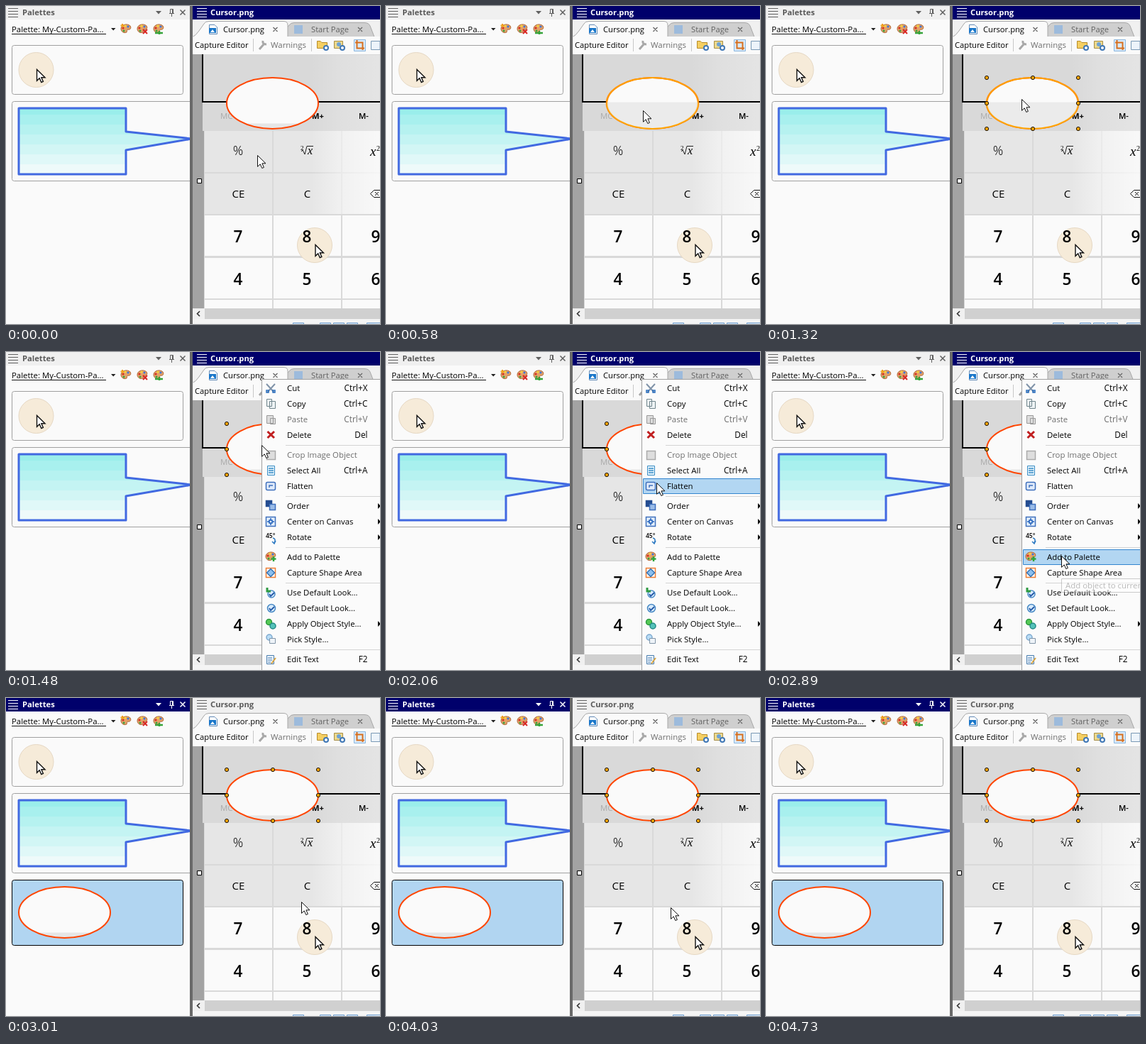
Animation of 527x448 px, one loop 5.24 s. Source, as an HTML page:

```html
<!DOCTYPE html>
<html lang="en">
<head>
<meta charset="utf-8">
<title>Add to Palette</title>
<style>
html, body { margin: 0; width: 100%; height: 100%; overflow: hidden; background: #fafafa; }
svg { display: block; }
text { font: 11.4px "Open Sans", "Noto Sans", sans-serif; fill: #000; }
.bold { font-size: 11.2px; font-weight: 700; }
.digit { font-size: 22.5px; font-weight: 600; text-anchor: middle; }
.key { font-size: 15px; text-anchor: middle; }
.math { font: italic 17px "Liberation Serif", serif; }
.muted { fill: #6d6d6d; }
.end { font-size: 11.8px; text-anchor: end; }

.hover, .handles, .menu, .late, .early, .row, .tip, .pointer { animation: 5240ms step-end infinite; }
.hover { animation-name: hover; }
.handles { animation-name: handles; }
.menu { animation-name: menu; }
.late { animation-name: late; }
.early { animation-name: early; }
.flatten { animation-name: flatten; }
.center { animation-name: center; }
.rotate { animation-name: rotate; }
.add { animation-name: add; }
.tip { animation-name: tip; }
.pointer { animation-name: pointer; }

@keyframes hover { 0%, 28.244% { opacity: 0 } 8.206% { opacity: 1 } }
@keyframes handles { 0% { opacity: 0 } 22.519%, 100% { opacity: 1 } }
@keyframes menu { 0%, 57.442% { opacity: 0 } 28.244% { opacity: 1 } }
@keyframes late { 0% { opacity: 0 } 57.442%, 100% { opacity: 1 } }
@keyframes early { 0% { opacity: 1 } 57.442%, 100% { opacity: 0 } }
@keyframes flatten { 0%, 41.603% { opacity: 0 } 39.312% { opacity: 1 } }
@keyframes center { 0%, 43.893% { opacity: 0 } 41.603% { opacity: 1 } }
@keyframes rotate { 0%, 46.183% { opacity: 0 } 43.893% { opacity: 1 } }
@keyframes add { 0% { opacity: 0 } 46.183%, 100% { opacity: 1 } }
@keyframes tip { 0% { opacity: 0 } 55.152%, 100% { opacity: .5 } }
@keyframes pointer {
  0% { transform: translate(354px, 210px) }
  5.343% { transform: translate(354px, 194px) }
  8.206% { transform: translate(363px, 165px) }
  11.068% { transform: translate(362px, 147px) }
  13.358% { transform: translate(361px, 133px) }
  16.412% { transform: translate(360px, 131px) }
  39.312% { transform: translate(381px, 184px) }
  41.603% { transform: translate(403px, 240px) }
  43.893% { transform: translate(413px, 267px) }
  46.183% { transform: translate(415px, 279px) }
  49.236% { transform: translate(416px, 287px) }
  62.595% { transform: translate(404px, 286px) }
  65.648% { transform: translate(387px, 283px) }
  76.908% { transform: translate(401px, 295px) }
  79.198% { transform: translate(420px, 310px) }
  82.251% { transform: translate(442px, 348px) }
  84.541% { transform: translate(472px, 416px) }
  87.404% { transform: translate(475px, 443px) }
  90.267%, 100% { transform: translate(540px, 460px) }
}
</style>
</head>
<body>
<svg width="527" height="448" viewBox="0 0 527 448">
  <defs>
    <linearGradient id="fade">
      <stop offset="0" stop-color="#fff" stop-opacity="0"/>
      <stop offset=".45" stop-color="#fff" stop-opacity=".45"/>
      <stop offset="1" stop-color="#fff" stop-opacity=".75"/>
    </linearGradient>
    <clipPath id="panel"><path d="M0 0H259V448H0z"/></clipPath>
    <clipPath id="balloon"><path d="M18 144H169V177L262 187L169 203V237H18z"/></clipPath>
    <clipPath id="oval"><ellipse rx="64.5" ry="36"/></clipPath>
    <path id="arrow" d="M.5 .5V16.3L4.2 12.8L6.8 18.5L9.4 17.4L6.9 11.8H12z" fill="#fff" stroke="#111"/>
    <g id="spot">
      <circle r="24.5" fill="#f6ebd9" stroke="#e6d8c4"/>
      <use href="#arrow" transform="translate(.5 -1)" stroke-width="1.4"/>
    </g>
    <g id="bars"><path d="M0 .5H14M0 4.5H14M0 8.5H14M0 12.5H14" fill="none" stroke="currentColor"/></g>
    <g id="shape">
      <g clip-path="url(#oval)">
        <path d="M-65-37H65V37H-65z" fill="#fafafa"/>
        <path d="M-65 28.5H65V37H-65z" fill="#e6e6e6"/>
      </g>
      <ellipse rx="64.5" ry="36" fill="none" stroke="#ff4500" stroke-width="2"/>
    </g>
    <g id="paints">
      <path d="M-7 0C-7-6 2-8 6-4C8-1 6 2 3 1C1 1 2 3 1 5C-3 7-7 4-7 0z" fill="#e3a268" stroke="#b0683a"/>
      <circle cx="-4" cy="-1" r="1.5" fill="#d52a20"/><circle cx="-1" cy="-4" r="1.5" fill="#f7d83c"/>
      <circle cx="3" cy="-3" r="1.5" fill="#3b73d8"/><circle cx="-3" cy="3" r="1.5" fill="#3ba23f"/>
    </g>
    <g id="winctl" fill="none" stroke="currentColor">
      <path d="M211 7H219L215 11.5z" fill="currentColor" stroke="none"/>
      <path d="M230 10.500H237M231.500 10V4.500H235.500V10M234.500 5V10M233.500 11V15"/>
      <path d="M245.5 5.5L252.5 12.5M252.5 5.5L245.5 12.5" stroke-width="1.5"/>
    </g>
  </defs>

  <!-- palette panel -->
  <g clip-path="url(#panel)">
    <path d="M0 0H259V448H0z" fill="#fafafa"/>
    <path d="M0 0H259V19H0z" fill="#f0f0f0"/>
    <g color="#606060"><use href="#bars" x="3" y="3"/><use href="#winctl"/></g>
    <text class="bold" x="23" y="13" style="fill:#5a5a5a">Palettes</text>
    <g class="late" color="#fff">
      <path d="M0 0H259V19H0z" fill="#00006b"/>
      <use href="#bars" x="3" y="3"/><use href="#winctl"/>
      <text class="bold" x="23" y="13" style="fill:#fff">Palettes</text>
    </g>
    <text x="8" y="37">Palette: My-Custom-Pa...</text>
    <path d="M8 39.5H141" stroke="#111"/>
    <path d="M148 31H154.500L151.200 34.500z" fill="#222"/>
    <use href="#paints" x="169" y="32"/><use href="#paints" x="192" y="32"/><use href="#paints" x="215" y="32"/>
    <path d="M164 25V30M161.500 27.500H166.500" stroke="#f0a020" stroke-width="2"/>
    <path d="M193 33L199 39M199 33L193 39" stroke="#d8231f" stroke-width="2"/>
    <path d="M210 38H221M216 35V40" stroke="#35a33a" stroke-width="2.500"/>
    <g fill="#fafafa" stroke="#a0a0a0">
      <rect x="8.500" y="55.500" width="241" height="69" rx="3"/>
      <rect x="8.500" y="134.500" width="270" height="112" rx="3"/>
    </g>
    <use href="#spot" x="42.500" y="90"/>
    <g id="bands" clip-path="url(#balloon)"></g>
    <path d="M18 144H169V177L262 187L169 203V237H18z" fill="none" stroke="#4169e1" stroke-width="3" stroke-linejoin="round"/>
    <g class="late">
      <rect x="8.500" y="256.500" width="241" height="92" rx="3" fill="#b1d5f1" stroke="#000"/>
      <use href="#shape" x="82.500" y="302"/>
    </g>
  </g>
  <path d="M259 0H263V448H259z" fill="#696969"/>

  <!-- editor chrome -->
  <path d="M263 0H527V448H263z" fill="#f0f0f0"/>
  <g color="#606060"><use href="#bars" x="269" y="3"/></g>
  <text class="bold" x="288" y="13" style="fill:#5a5a5a">Cursor.png</text>
  <g class="early" color="#fff">
    <path d="M263 0H527V19H263z" fill="#00006b"/>
    <use href="#bars" x="269" y="3"/>
    <text class="bold" x="288" y="13" style="fill:#fff">Cursor.png</text>
  </g>
  <path d="M385 43.500L399 27Q401 23.500 406 23.500H505Q511 23.500 513 28L519 43.500z" fill="#cfcfcf" stroke="#a8a8a8"/>
  <path d="M263 43.500H527" stroke="#b0b0b0"/>
  <path d="M263 43.500Q267 42 272 35L279 25Q281 21.500 286 21.500H391Q397 21.500 397 27V43.500z" fill="#fafafa" stroke="#a8a8a8"/>
  <path d="M263 43H527V68H263z" fill="#fafafa"/>
  <path d="M286.500 26.500H294L297.500 30V39.500H286.500z" fill="#fff" stroke="#6189b5"/>
  <path d="M286 31H296V38H286z" fill="#1976c9"/>
  <path d="M288 37L291 33L294 37z" fill="#fff"/>
  <path d="M406 27H418V39H406z" fill="#9dbbdc"/>
  <text x="306" y="37" style="font-size:11.2px">Cursor.png</text>
  <text x="430" y="37" style="font-size:11.2px;fill:#606060">Start Page</text>
  <path d="M376.500 30L382.500 36M382.500 30L376.500 36M496 30L502 36M502 30L496 36" stroke="#666" stroke-width="1.300"/>
  <text x="266" y="59" style="font-size:11.2px">Capture Editor</text>
  <path d="M348.500 46V64M430.500 46V64" stroke="#c8c8c8"/>
  <path d="M357 61L364 53M362 49Q361 54 367 54" fill="none" stroke="#a8a8a8" stroke-width="3"/>
  <text class="muted" x="373" y="59">Warnings</text>
  <g stroke-width="1">
    <path d="M438.500 59.500V49.500H443L445 51.500H452.500V59.500z" fill="#f5cf62" stroke="#b78b28"/>
    <circle cx="451" cy="59" r="3" fill="#fff" stroke="#3f77b5" stroke-width="2"/>
    <path d="M462.500 49.500H474.500V59.500H462.500z" fill="#edd98c" stroke="#a68d45"/>
    <circle cx="469" cy="54" r="3" fill="#6ea2d4"/>
    <circle cx="474" cy="59" r="3" fill="#fff" stroke="#3f77b5" stroke-width="2"/>
    <path d="M490.500 47.500H506.500V63.500H490.500z" fill="#d9eafa" stroke="#8bb7df"/>
    <path d="M494.500 48V59.500H505M492 51.500H502.500V62" fill="none" stroke="#d76f1d" stroke-width="2"/>
    <path d="M514.500 49.500H527V61.500H514.500z" fill="#edf4fb" stroke="#7a99b5"/>
  </g>

  <!-- captured calculator -->
  <path d="M263 68H527V426H263z" fill="#a3a3a3"/>
  <path d="M277 68H527V176H277zM279 176H527V426H279z" fill="#d9d9d9"/>
  <path d="M277 68V135H527" fill="none" stroke="#000" stroke-width="2"/>
  <g id="keys"></g>
  <path d="M430 176H527V293H430z" fill="url(#fade)"/>
  <path d="M430 69H527V134H430zM430 136H527V176H430z" fill="url(#fade)" opacity=".4"/>
  <text x="302" y="159" style="fill:#aaa">MC</text>
  <text class="bold" x="431" y="159">M+</text>
  <text class="bold" x="497" y="159" style="font-weight:600">M-</text>
  <text class="key" x="327" y="210" style="font-size:18px;font-weight:300">%</text>
  <text class="math" x="415" y="203" style="font-size:9px;font-style:normal">2</text>
  <path d="M416 205L418 203L421 209L424 197.500H433" fill="none" stroke="#222"/>
  <text class="math" x="425" y="209" style="font-size:16px">x</text>
  <text class="math" x="513" y="211" style="font-size:19px">x</text>
  <text class="math" x="522" y="204" style="font-size:10px;font-style:normal">2</text>
  <text class="key" x="327.500" y="270">CE</text>
  <text class="key" x="424.500" y="270">C</text>
  <path d="M527 259.500H518.500L513.500 264.500L518.500 269.500H527M520 262L525 267M525 262L520 267" fill="none" stroke="#111"/>
  <use href="#spot" x="435" y="337"/>
  <text class="digit" x="327" y="333">7</text><text class="digit" x="424" y="333">8</text><text class="digit" x="521" y="333">9</text>
  <text class="digit" x="327" y="393">4</text><text class="digit" x="424" y="393">5</text><text class="digit" x="521" y="393">6</text>
  <path d="M269.500 243.500H275.500V249.500H269.500z" fill="#fff" stroke="#000"/>

  <path d="M263 426H527V441H263z" fill="#f0f0f0"/>
  <path d="M280 426H527V441H280z" fill="#d0d0d0"/>
  <path d="M273 430L269.500 433.500L273 437" fill="none" stroke="#333" stroke-width="1.600"/>
  <path d="M263 441H527V448H263z" fill="#f4f4f4"/>
  <g fill="#d9eafa" stroke="#6f9fd0">
    <path d="M404.500 449V446.500H419.500V449M442.500 449V446.500H457.500V449M461.500 449V446.500H476.500V449M480.500 449V446.500H495.500V449M508.500 449V446.500H530"/>
  </g>

  <!-- selected ellipse -->
  <use href="#shape" x="375.500" y="137"/>
  <g class="hover" transform="translate(375.500 137)">
    <path d="M-65-1.500H65V37H-65z" fill="#ebebeb" clip-path="url(#oval)"/>
    <ellipse rx="64.500" ry="36" fill="none" stroke="#ffa500" stroke-width="2"/>
  </g>
  <g class="handles" id="handles" fill="#ffa500" stroke="#111"></g>

  <!-- context menu -->
  <g class="menu">
    <path d="M360.500 449V38.500H528V449" fill="#fbfbfb" stroke="#a0a0a0"/>
    <g fill="#b2d6f2" stroke="#3385cf">
      <path class="row flatten" d="M362.500 178.500H528V199.500H362.500z"/>
      <path class="row center" d="M362.500 228.500H528V249.500H362.500z"/>
      <path class="row rotate" d="M362.500 250.500H528V271.500H362.500z"/>
      <path class="row add" d="M362.500 278.500H528V299.500H362.500z"/>
    </g>
    <path d="M394 131.500H527M394 203.500H527M394 275.500H527M394 325.500H527M394 419.500H527" stroke="#d4d4d4"/>
    <g id="items"></g>
    <g fill="none" stroke-width="1.500">
      <path d="M367 45L378 57M379 45L368 57" stroke="#8093a8" stroke-width="2"/>
      <path d="M367 54h3v3h-3zM376 54h3v3h-3z" stroke="#2a6fc0"/>
      <path d="M367.500 66.500h7v10h-7zM371.500 69.500h8v10h-8z" fill="#eef3f5" stroke="#70858c" stroke-width="1"/>
      <path d="M367.500 89.500h9v11h-9zM372.500 93.500h7v8h-7z" fill="#ddd" stroke="#999" stroke-width="1"/>
      <path d="M368.500 112L378 121M378 112L368.500 121" stroke="#c01f20" stroke-width="3"/>
      <path d="M367.500 139.500h12v12h-12z" fill="#ddd" stroke="#aaa"/>
      <path d="M368.500 160.500h10v13h-10z" fill="#e4f3fc" stroke="#398dc5" stroke-width="1"/>
      <path d="M370 164h7M370 167h7M370 170h7" stroke="#398dc5"/>
      <rect x="366.500" y="183.500" width="13" height="11" rx="2" fill="#dfeafa" stroke="#3f70bd"/>
      <path d="M371 191V188H376" stroke="#3f70bd"/>
      <path d="M366.500 209.500h8v8h-8z" fill="#244d91" stroke="#244d91"/>
      <path d="M371.500 214.500h8v8h-8z" fill="#9bbce8" stroke="#3f70bd"/>
      <path d="M366.500 232.500h13v13h-13z" fill="#e3effc" stroke="#3f70bd"/>
      <path d="M373 234V237M373 241V244M368 239H371M375 239H378M371 237h4v4h-4z" stroke="#2362bb"/>
      <path d="M376 262Q381 263 378 269M375 267L378 270L380 266" stroke="#2a78c2"/>
      <path d="M366.500 304.500h13v13h-13z" stroke="#ef7d32"/>
      <path d="M373 305.500L378.500 311L373 316.500L367.500 311z" fill="#8cc0ef" stroke="#3674b5"/>
      <circle cx="374" cy="341" r="5" fill="#d9ecfc" stroke="#4b8bc6"/>
      <path d="M368 332v5h5" stroke="#2e9a43" stroke-width="3"/>
      <path d="M371 341l2 3l5-5" stroke="#285caa" stroke-width="2"/>
      <circle cx="374" cy="361" r="5.500" fill="#d9ecfc" stroke="#4b8bc6"/>
      <path d="M371 361l2 3l5-5" stroke="#285caa" stroke-width="2"/>
      <circle cx="370.500" cy="380.500" r="4" fill="#56c956" stroke="#2b9a3d"/>
      <circle cx="376" cy="386" r="4" fill="#55c2ba" stroke="#238a86"/>
      <circle cx="371" cy="402" r="4" fill="#b9ddf7" stroke="#7fa9ce"/>
      <path d="M371.500 403.500h8v7h-8z" fill="#eef3f8" stroke="#8296a8" stroke-width="1"/>
      <path d="M367.500 427.500h10v12h-10z" fill="#e8f1fb" stroke="#4b7eae" stroke-width="1"/>
      <path d="M369 431h6M369 434h6M369 437h4" stroke="#4b7eae" stroke-width="1"/>
      <path d="M380 431L374 439" stroke="#d9a441" stroke-width="2"/>
    </g>
    <text x="366" y="262" style="font-size:8.500px;font-weight:600">45°</text>
    <use href="#paints" x="373" y="288"/>
    <path d="M377 288V295M373.500 291.500H380.500" stroke="#30a53b" stroke-width="2.500"/>
    <g class="tip">
      <path d="M416.500 319.500H528V338.500H416.500z" fill="#fff" stroke="#999"/>
      <text x="422" y="333" style="fill:#777">Add object to current palette</text>
    </g>
  </g>
  <use class="pointer" href="#arrow"/>
</svg>
<script>
const fill = (id, parts) => { document.getElementById(id).innerHTML = parts.join(""); };
const rect = (x, y, w, h, color) =>
  `<rect x="${x}" y="${y}" width="${w}" height="${h}" fill="${color}"/>`;

fill("bands", Array.from({ length: 7 }, (_, i) =>
  rect(18, i ? 139 + i * 14 : 144, 250, 15, `rgb(${154 + i * 14}, ${238 + i * 2}, ${235 + i * 2.5})`)));

const rows = [[176, 58], [236, 57], [295, 57], [355, 57], [414, 12]];
fill("keys", rows.flatMap(([y, h], i) =>
  [280, 377, 474].map(x => rect(x, y, 95, h, i < 2 ? "#e6e6e6" : "#fafafa"))));

const grid = [101, 137, 173].flatMap(y => [311, 376, 440].map(x => [x, y]));
fill("handles", grid.filter((_, i) => i !== 4).map(([x, y]) => `<circle cx="${x}" cy="${y}" r="2.6"/>`));

// Label, row centre, shortcut or ">" for a submenu, disabled
const items = [
  ["Cut", 51, "Ctrl+X"], ["Copy", 73, "Ctrl+C"], ["Paste", 95, "Ctrl+V", true], ["Delete", 117, "Del"],
  ["Crop Image Object", 145, "", true], ["Select All", 167, "Ctrl+A"], ["Flatten", 189],
  ["Order", 217, ">"], ["Center on Canvas", 239, ">"], ["Rotate", 261, ">"],
  ["Add to Palette", 289], ["Capture Shape Area", 311],
  ["Use Default Look...", 339], ["Set Default Look...", 361], ["Apply Object Style...", 383, ">"],
  ["Pick Style...", 405], ["Edit Text", 433, "F2"]
];
fill("items", items.map(([label, y, extra = "", disabled]) => {
  const tone = disabled ? "muted" : "";
  const side = extra === ">"
    ? `<path d="M524 ${y - 4}l4 4l-4 4z" fill="#111"/>`
    : `<text class="end ${tone}" x="509.5" y="${y + 4}">${extra}</text>`;
  return `<text class="${tone}" x="396" y="${y + 4}">${label}</text>${side}`;
}));
</script>
</body>
</html>
```
